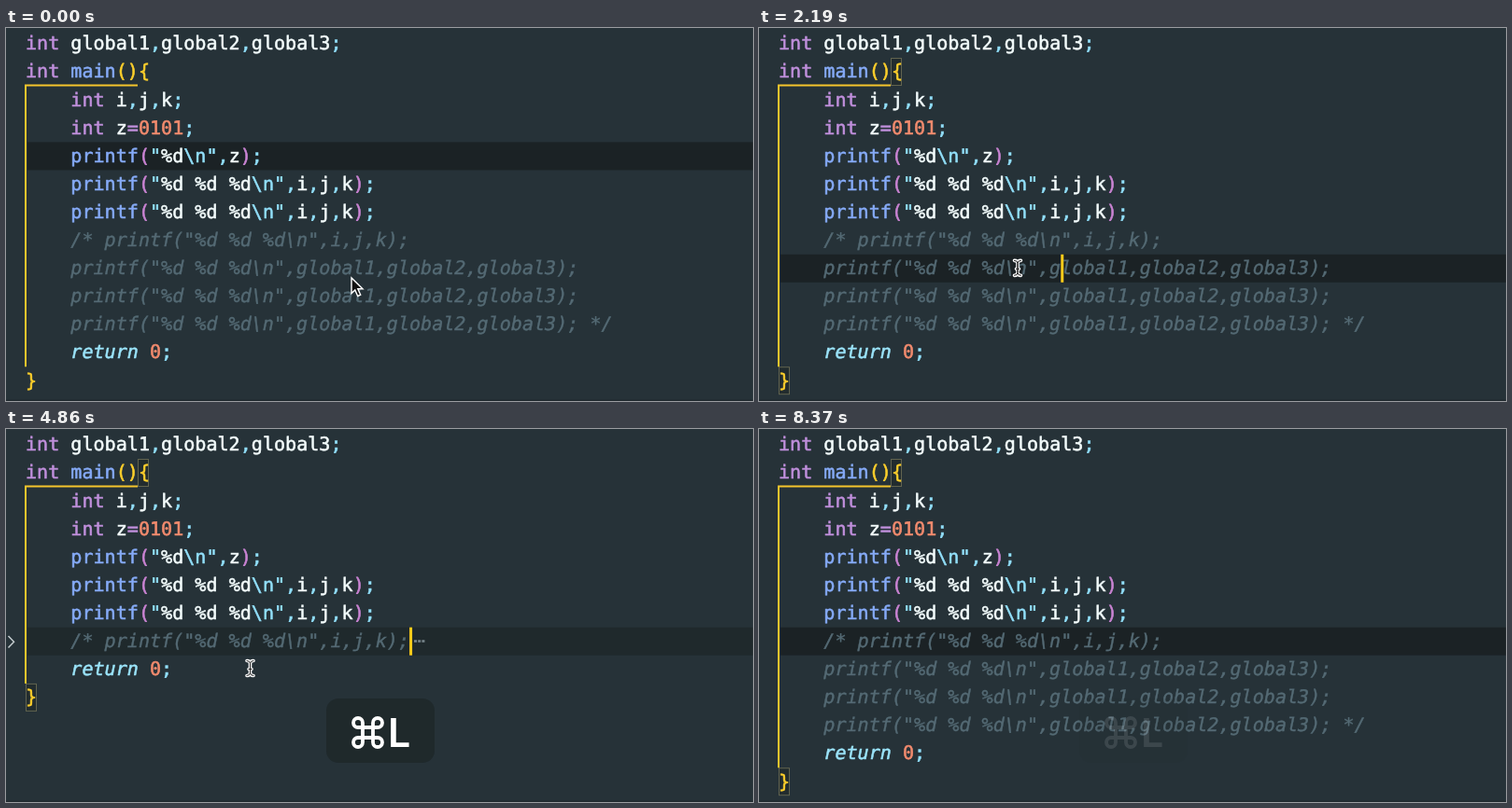
These frames come from a looping animation (800 px wide and 400 px high, 8.4 s). An HTML page:

```html
<!DOCTYPE html>
<html lang="en">
<head>
<meta charset="utf-8">
<title>Code folding</title>
<style>
html, body { margin: 0; width: 100%; height: 100%; overflow: hidden; background: #263238; }
svg { display: block; width: 800px; height: 400px; }
.code text { font: 20.09px "DejaVu Sans Mono", "Liberation Mono", monospace; white-space: pre; font-variant-ligatures: none; text-rendering: geometricPrecision; }
.code tspan { fill: currentColor; stroke: currentColor; stroke-width: .55px; }
.type, .op { color: #c08fdc; }
.func { color: #86abf8; }
.flow { color: #9be4fa; font-style: italic; }
.punct { color: #92e0fb; }
.num { color: #f28b6e; }
.outer { color: #ffd02b; }
.inner { color: #cb84d4; }
.plain { color: #f3fcfc; }
.code .note { color: #546a74; font-style: italic; stroke-width: .4px; }
.key { font: 600 43px Inter, "Open Sans", sans-serif; fill: #fff; }
</style>
</head>
<body>
<svg id="stage" viewBox="0 0 800 400">
  <rect width="800" height="400" fill="#263238"/>
  <rect y="398.5" width="800" height="1.5" fill="#20292e"/>
  <rect id="highlight" x="23" width="777" height="30"/>
  <g id="boxes" fill="#222c2e" stroke="#62644f">
    <rect x="141.5" y="32.5" width="11" height="29"/>
    <rect id="closeBox" x="21.5" width="11" height="29"/>
  </g>
  <path id="guide" fill="none" stroke="#f5c52c" stroke-width="2"/>
  <g class="code" id="head"></g>
  <g class="code" id="body"></g>
  <g class="code" id="tail"></g>
  <g id="foldMark">
    <path d="M2.5 222l6 6.3-6 6.3" fill="none" stroke="#c3cbce" stroke-width="1.5"/>
    <path d="M437 227.5h3m1.2 0h3m1.2 0h3" stroke="#78868c" stroke-width="2.6"/>
  </g>
  <rect id="caret" width="3" height="30" fill="#ffcc1a"/>
  <g id="arrow">
    <path d="M0 0v16.5l3.8-3.6 2.9 6.6 3-1.3-2.9-6.4h5.2z" fill="#111" stroke="#fff" stroke-width="1.4"/>
  </g>
  <g id="beam" fill="none" stroke-linecap="round">
    <path d="M-3.5-8q3.5 0 3.5 3V5q0 3-3.5 3M3.5-8q-3.5 0-3.5 3V5q0 3 3.5 3M-1.5 1h3" stroke="#fff" stroke-width="3.6"/>
    <path d="M-3.5-8q3.5 0 3.5 3V5q0 3-3.5 3M3.5-8q-3.5 0-3.5 3V5q0 3 3.5 3M-1.5 1h3" stroke="#222" stroke-width="1"/>
  </g>
  <g id="popup">
    <rect x="343" y="289" width="116" height="69" rx="13" fill="#1f282b" fill-opacity=".93"/>
    <path transform="translate(387.5 325.5)" fill="none" stroke="#fff" stroke-width="3.8"
      d="M-10.5-5.5a5 5 0 1 1 5-5v21a5 5 0 1 1-5-5h21a5 5 0 1 1-5 5v-21a5 5 0 1 1 5 5z"/>
    <text class="key" x="409" y="341">L</text>
  </g>
</svg>
<script>
const LOOP = 8400, PITCH = 30.1, LEFT = 21, ADVANCE = 12.09;
const CLICK = 960, FOLD = 4800, UNFOLD = 7050;
const lines = [
  'int global1,global2,global3;',
  'int main(){',
  '    int i,j,k;',
  '    int z=0101;',
  '    printf("%d\\n",z);',
  '    printf("%d %d %d\\n",i,j,k);',
  '    printf("%d %d %d\\n",i,j,k);',
  '    /* printf("%d %d %d\\n",i,j,k);',
  ...Array(2).fill('    printf("%d %d %d\\n",global1,global2,global3);'),
  '    printf("%d %d %d\\n",global1,global2,global3); */',
  '    return 0;',
  '}'
];
const token = /(?<type>int\b)|(?<func>printf|main)|(?<flow>return)|(?<punct>"|\\n|[,;])|(?<op>=)|(?<num>\b0\d*)|(?<bracket>[(){}])|(?<plain>\s+|%d|\w+)/g;
const el = id => document.getElementById(id);
const set = (id, attrs) => { for (const k in attrs) el(id).setAttribute(k, attrs[k]); };
const show = (id, on) => set(id, { visibility: on ? 'visible' : 'hidden' });
const rowTop = row => 2 + row * PITCH;
const columnX = col => LEFT + col * ADVANCE;

function addSpan(parent, kind, content) {
  const span = document.createElementNS(parent.namespaceURI, 'tspan');
  span.setAttribute('class', kind);
  span.textContent = content;
  parent.append(span);
}

lines.forEach((line, row) => {
  const text = document.createElementNS(el('stage').namespaceURI, 'text');
  const source = line.trimStart();
  text.setAttribute('x', columnX(line.length - source.length));
  text.setAttribute('y', 23.3 + row * PITCH);
  if (row >= 7 && row <= 10) addSpan(text, 'note', source);
  else for (const { groups } of source.matchAll(token)) {
    const [kind, content] = Object.entries(groups).find(g => g[1] !== undefined);
    addSpan(text, kind !== 'bracket' ? kind : source.startsWith('printf') ? 'inner' : 'outer', content);
  }
  el(row < 8 ? 'head' : row < 11 ? 'body' : 'tail').append(text);
});

// Pointer stops: time, x, y; movement between them is eased.
const stops = [[0, 370, 268], [300, 370, 268], [880, 325, 260], [1750, 325, 260],
  [2400, 261.5, 256.5], [7850, 261.5, 256.5], [8280, 235, 425]];

function pointerAt(t) {
  const next = stops.findIndex(s => s[0] > t);
  if (next < 0) return stops[stops.length - 1].slice(1);
  const [t0, x0, y0] = stops[next - 1], [t1, x1, y1] = stops[next];
  const p = (t - t0) / (t1 - t0), e = p * p * (3 - 2 * p);
  return [x0 + (x1 - x0) * e, y0 + (y1 - y0) * e];
}

function popupOpacity(t) {
  const age = t - (t >= UNFOLD ? UNFOLD : FOLD);
  return age < 0 ? 0 : Math.max(0, Math.min(1, (1360 - age) / 380));
}

function draw(t) {
  const focused = t >= CLICK, moved = t >= FOLD, folded = moved && t < UNFOLD;
  const shift = folded ? -3 * PITCH : 0;
  const row = moved ? 7 : focused ? 8 : 4;
  const closeTop = rowTop(12) + shift;

  set('highlight', { y: rowTop(row), fill: folded ? '#1f292c' : '#1b2225' });
  set('closeBox', { y: closeTop + .5 });
  set('guide', { d: `M141 61.5H21V${closeTop}` });
  set('tail', { transform: `translate(0 ${shift})` });
  show('boxes', focused);
  show('body', !folded);
  show('foldMark', folded);

  const blinkAge = t - (moved ? FOLD : CLICK);
  set('caret', { x: columnX(moved ? 34 : 25), y: rowTop(row) });
  show('caret', focused && blinkAge % 1000 < 500);

  const place = { transform: `translate(${pointerAt(t)})` };
  const overText = t >= 450;
  set('arrow', place);
  set('beam', place);
  show('arrow', !overText);
  show('beam', overText);
  set('popup', { opacity: popupOpacity(t) });
}

const start = performance.now();
function tick() {
  draw((performance.now() - start) % LOOP);
  requestAnimationFrame(tick);
}
tick();
</script>
</body>
</html>
```
